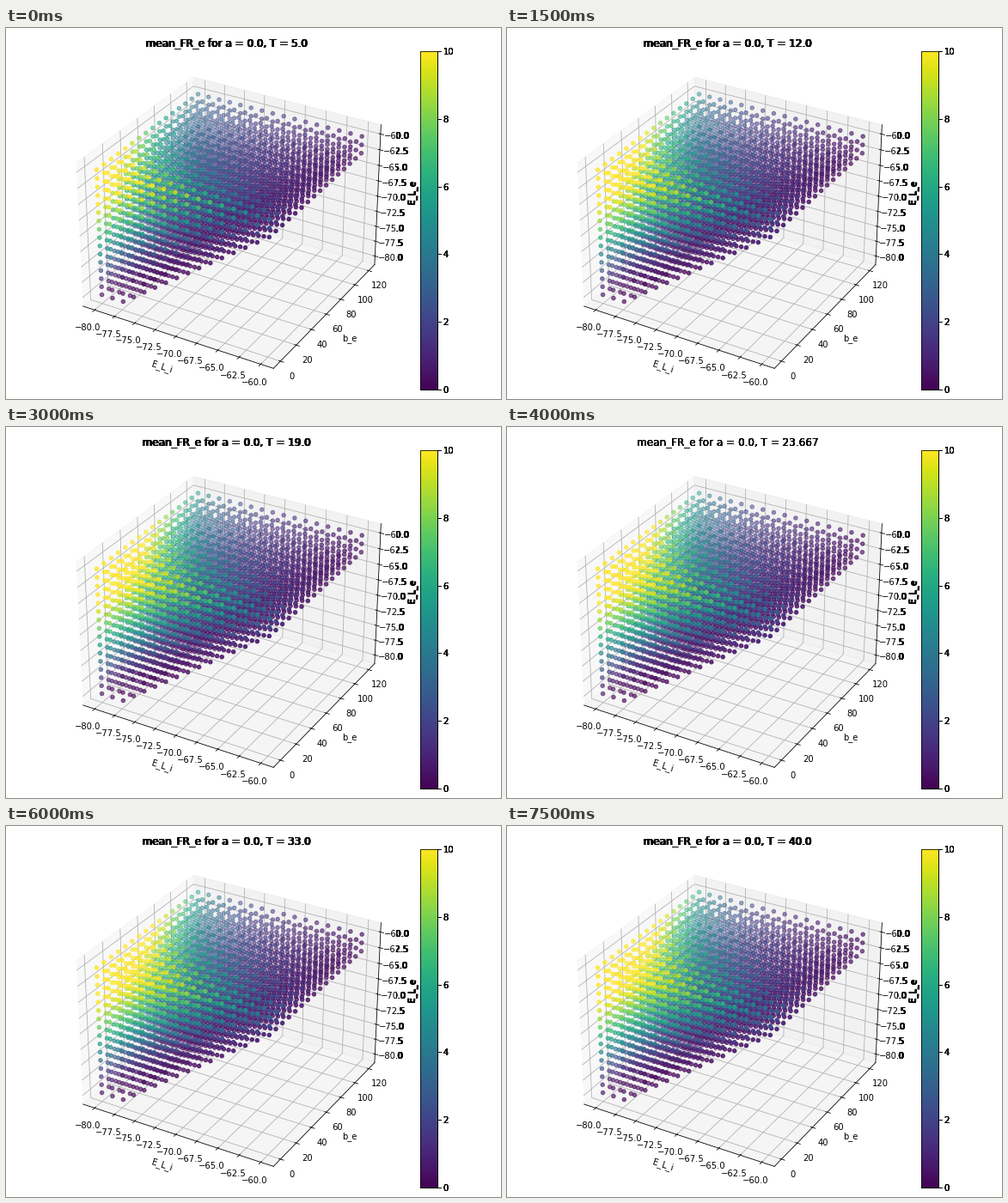
Animation of 576 by 432 pixels, one loop 8 s. Source, as a matplotlib script:

```python
import numpy as np
import matplotlib.pyplot as plt
from matplotlib.animation import FuncAnimation
from matplotlib.cm import ScalarMappable
from matplotlib.colors import Normalize

WIDTH, HEIGHT, DPI = 576, 432, 72
FRAMES, INTERVAL = 16, 500
LAYERS = 6  # stacked axes darken the text outside the plot square
STEPS = 16
MARGIN, SIDE = 10.8, 394.4
PLOT_RIGHT, BAR_LEFT = 454.3, 482.0

plt.rcParams["font.family"] = "DejaVu Sans"
fig = plt.figure(figsize=(WIDTH / DPI, HEIGHT / DPI), dpi=DPI, facecolor="white")
norm = Normalize(0, 10)
times = np.linspace(5, 40, FRAMES)


def pixel_rect(x, y, w, h):
    return [x / WIDTH, y / HEIGHT, w / WIDTH, h / HEIGHT]


def padded(low, high):
    half = (high - low) / 2 * 1.1 * 25 / 24
    middle = (low + high) / 2
    return middle - half, middle + half


def set_limits(ax):
    ax.set_xlim(*padded(-80, -60))
    ax.set_ylim(*padded(0, 120))
    ax.set_zlim(*padded(-80, -60))


def make_axes(shift):
    rect = pixel_rect(PLOT_RIGHT - SIDE + shift, MARGIN, SIDE, SIDE)
    ax = fig.add_axes(rect, projection="3d")
    potentials = np.arange(-80, -59, 2.5)
    ax.set_xticks(potentials)
    ax.set_yticks(np.arange(0, 121, 20))
    ax.set_zticks(potentials)
    ax.set_xlabel("E_L_i")
    ax.set_ylabel("b_e")
    ax.set_zlabel("E_L_e")
    ax.view_init(elev=30, azim=-60)
    set_limits(ax)
    return ax


def make_colorbar():
    cax = fig.add_axes(pixel_rect(BAR_LEFT, MARGIN, SIDE / 20, SIDE))
    fig.colorbar(ScalarMappable(norm, "viridis"), cax=cax)


def firing_rate(i, j, k, T):
    """Rate on the grid: i along E_L_i, j along b_e, k along E_L_e."""
    drive = np.log1p(np.exp(1.3 * (k - 0.76 * i - 1))) / 1.3
    base = 1.3 * drive / (1 + drive / 35)
    settle = 1 - 5 / T
    gain = (0.119 - 0.055 * settle) * (1 + 0.15 * i)
    gain = gain * (1 + 0.05 * (STEPS - 1 - k))
    power = (1.6 + 1.6 * settle**2) / (1 + 0.05 * i)
    return base / (1 + (gain * j) ** power)


i, j, k = (g.ravel() for g in np.meshgrid(*[np.arange(STEPS)] * 3, indexing="ij"))
keep = i - k <= 2
i, j, k = i[keep], j[keep], k[keep]

layers = []
for layer in range(LAYERS):
    layers.append(make_axes(shift=-0.8 if layer < LAYERS // 2 else 0))
    make_colorbar()

last = STEPS - 1
front = layers[-1]
points = front.scatter(
    -80 + 20 * i / last, 120 * j / last, -80 + 20 * k / last,
    c=firing_rate(i, j, k, times[0]), cmap="viridis", norm=norm, s=20,
)
set_limits(front)


def update(frame):
    T = times[frame]
    points.set_array(firing_rate(i, j, k, T))
    for ax in layers:
        # 3D axes scale the title height by 0.92
        ax.set_title(f"mean_FR_e for a = 0.0, T = {round(float(T), 3)}", y=1 / 0.92)
    return [points]


anim = FuncAnimation(fig, update, frames=FRAMES, interval=INTERVAL,
                     init_func=lambda: update(0), repeat=True, repeat_delay=0)
plt.show()
```
